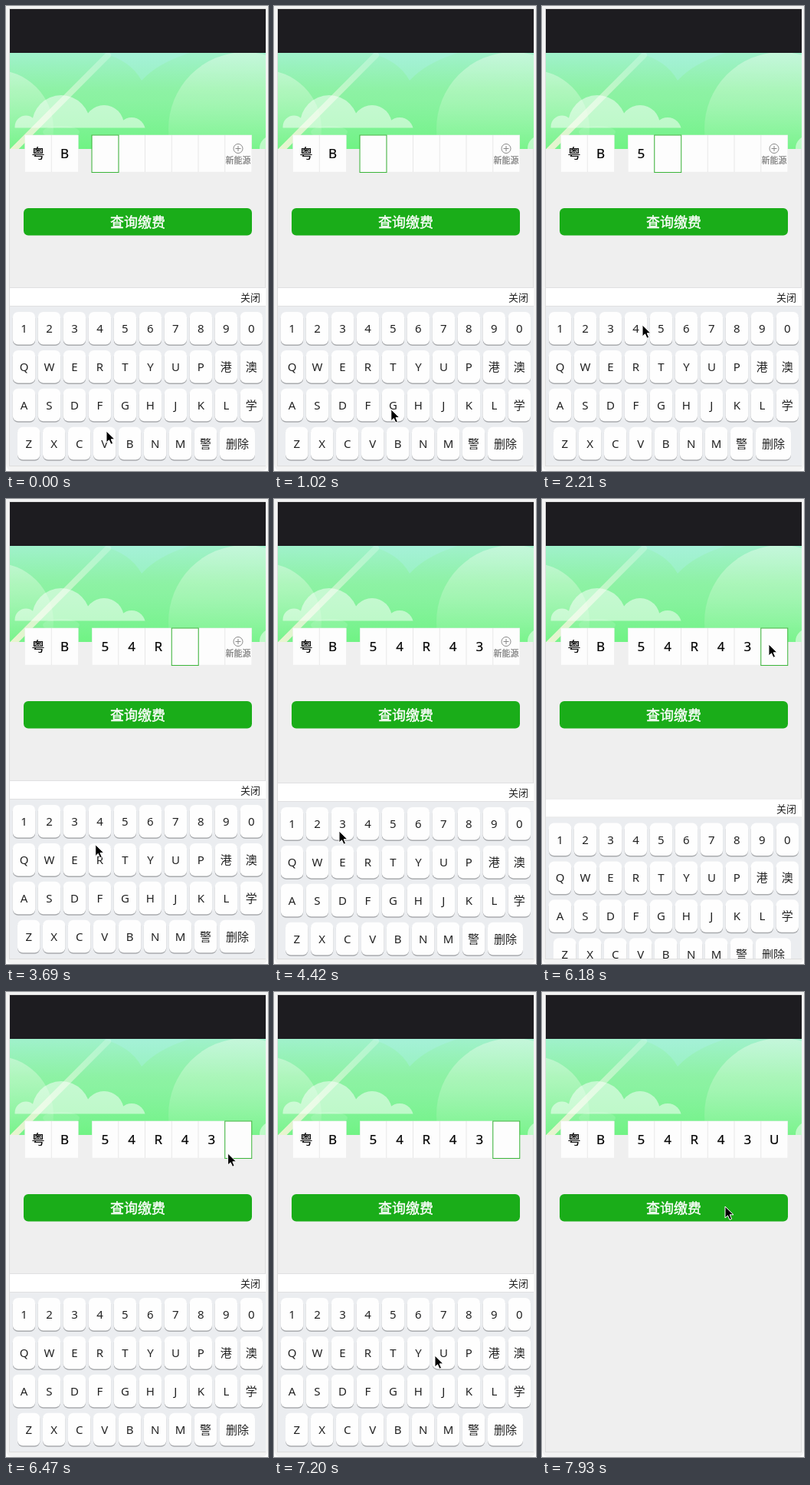
Animation of 342x605 px, one loop 8 s. Source, as an HTML page:

```html
<!DOCTYPE html>
<html lang="zh">
<head>
<meta charset="utf-8">
<style>
  html, body { margin: 0; width: 100%; height: 100%; overflow: hidden; background: #fff; }
  svg { display: block; width: 342px; height: 605px; }
  text { font-family: "Noto Sans", "Noto Sans CJK SC", "Noto Sans CJK", sans-serif; text-anchor: middle; }
  .cell { font-size: 17px; fill: #000; stroke: #000; stroke-width: .2px; }
  .key { font-size: 15px; fill: #222; }
</style>
</head>
<body>
<svg viewBox="0 0 342 605">
  <defs>
    <linearGradient id="sky" x2="0" y2="1">
      <stop stop-color="#a5f1d8"/><stop offset=".5" stop-color="#92f2b4"/><stop offset="1" stop-color="#70f384"/>
    </linearGradient>
    <linearGradient id="hill" x2="0" y2="1">
      <stop stop-color="#8cf29c" stop-opacity=".2"/><stop offset=".4" stop-color="#84f28c" stop-opacity=".5"/>
      <stop offset="1" stop-color="#70f384" stop-opacity=".3"/>
    </linearGradient>
    <linearGradient id="glow" x2="0" y2="1">
      <stop stop-color="#f6fff0" stop-opacity=".42"/><stop offset=".65" stop-color="#f6fff0" stop-opacity=".06"/>
    </linearGradient>
    <linearGradient id="beam" x1="0" y1="1" x2="1" y2="0">
      <stop stop-color="#fff4dc" stop-opacity=".85"/><stop offset="1" stop-color="#e8fff0" stop-opacity=".3"/>
    </linearGradient>
    <clipPath id="banner"><rect x="5" y="61" width="334" height="125"/></clipPath>
    <clipPath id="cloud"><rect x="5" y="100" width="200" height="58.5"/></clipPath>
    <clipPath id="screen"><rect x="5" y="4" width="334" height="594"/></clipPath>
  </defs>

  <path d="M0 0H342V595Q342 605 332 605H10Q0 605 0 595Z" fill="#f3f3f3"/>
  <rect x="4.5" y="3.5" width="334" height="595" fill="#efefef" stroke="#dedede"/>
  <rect x="5" y="4" width="334" height="57" fill="#1d1c20"/>

  <g clip-path="url(#banner)">
    <rect x="5" y="61" width="334" height="125" fill="url(#sky)"/>
    <path d="M5 61H125Q162 70 177 97Q198 74 240 61H339V186H5Z" fill="url(#hill)"/>
    <circle cx="-15" cy="160" r="77" fill="url(#glow)"/>
    <circle cx="312" cy="160" r="100" fill="url(#glow)"/>
    <path d="M8 189L133 64" stroke="url(#beam)" stroke-width="8" stroke-linecap="round"/>
    <g clip-path="url(#cloud)" opacity=".5" fill="#fff">
      <circle cx="26" cy="157" r="14.5"/><circle cx="72" cy="154" r="38"/>
      <circle cx="128" cy="155" r="26"/><circle cx="164" cy="163" r="18"/>
    </g>
    <ellipse cx="72" cy="164" rx="24" ry="8" fill="#fff" opacity=".12"/>
    <circle cx="347" cy="185" r="16" fill="#fff" opacity=".5"/>
  </g>

  <g id="cells"></g>
  <g id="energy">
    <circle cx="303" cy="185.5" r="6" fill="none" stroke="#888"/>
    <path d="M299.5 185.5h7M303 182v7" stroke="#888"/>
    <text x="303" y="205" font-size="11" fill="#777" stroke="#777" stroke-width=".2">新能源</text>
  </g>
  <rect id="focus" y="168" width="35" height="48.5" fill="none" stroke="#3cb63b"/>

  <rect x="23" y="263" width="298" height="35.5" rx="6" fill="#1aad19"/>
  <text x="172" y="287.5" font-size="18" fill="#fff" stroke="#fff" stroke-width=".4">查询缴费</text>

  <g clip-path="url(#screen)">
    <g id="keyboard">
      <rect x="5" y="366" width="334" height="24.5" fill="#fff"/>
      <path d="M5 366.5H339M5 390.5H339" stroke="#e0e0e2"/>
      <text x="319" y="384" font-size="13" fill="#222">关闭</text>
      <rect x="5" y="391" width="334" height="210" fill="#ebedf0"/>
    </g>
  </g>
  <path id="cursor" d="M0 0V15L3.5 11.8 6 17.3 8.6 16.2 6.2 10.8H11Z" fill="#000" stroke="#fff" stroke-linejoin="round"/>
</svg>

<script>
const LOOP = 8000, STEP = 146.9, LAST_STEP = 54;
const CELL_X = 112, CELL_W = 34.75;
const KEYBOARD_H = 235, SLIDE_STEPS = 2.04;
const $ = id => document.getElementById(id);

function add(parent, tag, attrs, content = '') {
  const node = document.createElementNS('http://www.w3.org/2000/svg', tag);
  for (const name in attrs) node.setAttribute(name, attrs[name]);
  node.textContent = content;
  return parent.appendChild(node);
}

function addCells(x, letters) {
  const group = $('cells');
  add(group, 'rect', { x: x + .25, y: 168, width: letters.length * CELL_W, height: 48, fill: '#fdfdfd', stroke: '#eee', 'stroke-width': .5 });
  return letters.map((letter, i) => {
    const left = x + i * CELL_W;
    if (i) add(group, 'path', { d: `M${left} 168V216`, stroke: '#e8e8e8' });
    return add(group, 'text', { x: left + CELL_W / 2, y: 198, class: 'cell' }, letter);
  });
}

function addKey(x, y, width, label) {
  const box = { x, width, height: 42.5, rx: 7 };
  add($('keyboard'), 'rect', { ...box, y: y + 1.5, fill: '#a9abae' });
  add($('keyboard'), 'rect', { ...box, y, fill: '#fefefe' });
  add($('keyboard'), 'text', { x: x + width / 2, y: y + 27, class: 'key' }, label);
}

addCells(24.5, ['粤', 'B']);
const typed = addCells(CELL_X, [...'54R43U']);
['1234567890', 'QWERTYUP港澳', 'ASDFGHJKL学', 'ZXCVBNM警'].forEach((row, r) => {
  [...row].forEach((label, i) => addKey((r === 3 ? 15 : 8.8) + i * 32.98, 398 + r * 49.9, 29.4, label));
});
addKey(279, 547.7, 46, '删除');

// Steps at which each character appears; the last cell is focused separately.
const typeAt = [13, 18, 24, 27, 30, 50];
const FOCUS_LAST = 41;

// Where the pointer rests between moves
const stops = [
  { arrive: 0, leave: 0, x: 131, y: 553 },
  { arrive: 2, leave: 2, x: 134, y: 566 },
  { arrive: 7, leave: 8, x: 155, y: 520 },
  { arrive: 12, leave: 13.8, x: 154, y: 415 },
  { arrive: 15.6, leave: 20, x: 123, y: 415 },
  { arrive: 23, leave: 24, x: 117, y: 460 },
  { arrive: 27, leave: 27, x: 116, y: 420 },
  { arrive: 29, leave: 32, x: 85, y: 432 },
  { arrive: 40, leave: 43, x: 296, y: 189 },
  { arrive: 49, leave: 50, x: 210, y: 473 },
  { arrive: 52, leave: 52, x: 291, y: 400 },
  { arrive: 54, leave: 55, x: 239, y: 279 }
];

const clamp = u => Math.min(1, Math.max(0, u));
const smooth = u => u * u * (3 - 2 * u);

// CSS "ease": cubic-bezier(.25, .1, .25, 1)
function ease(u) {
  const bezier = (s, a, b) => 3 * a * s * (1 - s) ** 2 + 3 * b * s * s * (1 - s) + s ** 3;
  let low = 0, high = 1;
  for (let i = 0; i < 20; i++) {
    const mid = (low + high) / 2;
    if (bezier(mid, .25, .25) < clamp(u)) low = mid; else high = mid;
  }
  return bezier(low, .1, 1);
}

function pointerAt(step) {
  const i = stops.findLastIndex(stop => step >= stop.arrive);
  const from = stops[i], to = stops[i + 1] || from;
  const u = step > from.leave ? smooth(clamp((step - from.leave) / (to.arrive - from.leave))) : 0;
  return [from.x + (to.x - from.x) * u, from.y + (to.y - from.y) * u];
}

function keyboardShift(step) {
  const slide = start => ease((step - start) / SLIDE_STEPS);
  return KEYBOARD_H * (slide(29.95) - slide(40.73) + slide(49.95));
}

function show(node, visible) {
  node.setAttribute('visibility', visible ? 'visible' : 'hidden');
}

function draw(time) {
  const step = Math.min(LAST_STEP, Math.floor((time % LOOP + 5) / STEP));
  const count = typeAt.filter(s => step >= s).length;

  typed.forEach((node, i) => show(node, i < count));
  show($('energy'), step < FOCUS_LAST);
  show($('focus'), count < 5 || (count === 5 && step >= FOCUS_LAST));
  $('focus').setAttribute('x', CELL_X + count * CELL_W);
  $('keyboard').setAttribute('transform', `translate(0 ${keyboardShift(step)})`);
  $('cursor').setAttribute('transform', `translate(${pointerAt(step)})`);
}

const start = performance.now();
function tick() {
  draw(performance.now() - start);
  requestAnimationFrame(tick);
}
tick();
</script>
</body>
</html>
```
